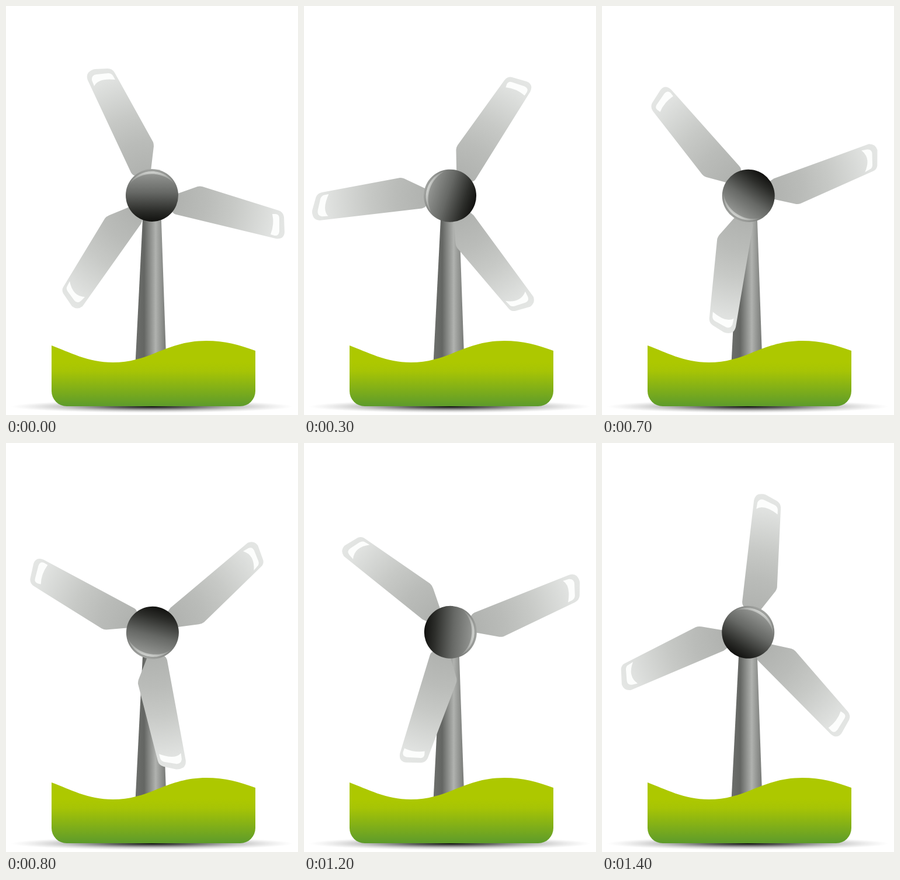
Recreate the animation shown at these times as an HTML page. Size 500 px wide and 700 px high, loop 1500 ms.

```html
<!DOCTYPE html>
<html lang="en">
<head>
<meta charset="utf-8">
<title>Wind turbine</title>
<style>
  html, body { margin: 0; width: 100%; height: 100%; overflow: hidden; background: #fff; }
  svg { display: block; width: 500px; height: 700px; }
</style>
</head>
<body>
<svg viewBox="0 0 500 700">
  <defs>
    <radialGradient id="shadow">
      <stop offset="0" stop-color="#000" stop-opacity=".95"/>
      <stop offset=".3" stop-color="#222" stop-opacity=".7"/>
      <stop offset=".65" stop-color="#555" stop-opacity=".3"/>
      <stop offset="1" stop-color="#999" stop-opacity="0"/>
    </radialGradient>
    <linearGradient id="grass" gradientUnits="userSpaceOnUse" x1="0" y1="610" x2="0" y2="685">
      <stop offset="0" stop-color="#adc800"/>
      <stop offset=".2" stop-color="#a6c405"/>
      <stop offset="1" stop-color="#5d9b2b"/>
    </linearGradient>
    <linearGradient id="steel" gradientUnits="userSpaceOnUse" x1="222" y1="0" x2="274" y2="0">
      <stop offset="0" stop-color="#6c6e6b"/>
      <stop offset=".28" stop-color="#646663"/>
      <stop offset=".66" stop-color="#b0b2af"/>
      <stop offset="1" stop-color="#767875"/>
    </linearGradient>
    <radialGradient id="vane" gradientUnits="userSpaceOnUse" cx="250" cy="324" r="235">
      <stop offset=".15" stop-color="#afb1ae"/>
      <stop offset=".4" stop-color="#babcb9"/>
      <stop offset=".6" stop-color="#c7c9c6"/>
      <stop offset=".9" stop-color="#e0e2e0"/>
      <stop offset="1" stop-color="#e4e6e4"/>
    </radialGradient>
    <linearGradient id="dome" x1="0" y1="0" x2="0" y2="1">
      <stop offset="0" stop-color="#a2a4a1"/>
      <stop offset=".15" stop-color="#8b8d8a"/>
      <stop offset=".45" stop-color="#666865"/>
      <stop offset=".8" stop-color="#2c2d2a"/>
      <stop offset="1" stop-color="#11110f"/>
    </linearGradient>
    <linearGradient id="glint" x1="0" y1="0" x2="0" y2="1">
      <stop offset="0" stop-color="#d2d4d1"/>
      <stop offset="1" stop-color="#a0a29f" stop-opacity=".3"/>
    </linearGradient>
  </defs>

  <ellipse cx="250" cy="685.5" rx="242" ry="11" fill="url(#shadow)"/>
  <path fill="url(#steel)" d="M234.5 355H265.5L274.5 612H221.5Z"/>
  <path fill="url(#grass)" d="M78 581C108 592 140 610 183 610C247 610 275 573 343 573C375 573 400 580 427 590V659A26 26 0 0 1 401 685H104A26 26 0 0 1 78 659Z"/>

  <g id="rotor">
    <g fill="url(#vane)">
      <path d="M140 127Q137 119 141 114Q146 109 152 108L174 107Q182 107 186 114L252 233Q253 236 253 240L248 282Q246 290 238 290L222 291Q217 290 214 285Z"/>
      <path d="M284 324L297 320L328 309Q332 308 336 309L467 350Q475 353 476 361L477 387Q476 400 462 398L292 357Q286 356 284 350Z"/>
      <path d="M216 342L177 358Q172 360 169 364L98 481Q95 486 98 492L113 514Q122 521 131 514L231 373L236 360Z"/>
    </g>
    <g fill="#fcfdfc">
      <path d="M151 137L147 127Q146 118 155 117L175 115Q180 115 183 119L187 126Q158 123 151 137Z"/>
      <path d="M456 356H462Q468 357 468 363V386Q467 394 460 393L453 391Q460 373 456 356Z"/>
      <path d="M109 471L104 481Q103 485 106 489L117 504Q122 510 128 505L135 498Q114 497 109 471Z"/>
    </g>
    <circle cx="250" cy="324" r="45" fill="url(#dome)"/>
    <path fill="url(#glint)" d="M212 304C229 276 271 276 288 304C269 282 231 282 212 304Z"/>
  </g>
</svg>
<script>
  const rotor = document.getElementById('rotor');
  // Counter-clockwise pose in degrees, held for one step each
  const angles = [0, 27.5, 51, 71.6, 90, 107.2, 126, 145.3, 165.4, 187, 211.2, 238, 266.6, 297, 328.3];
  const STEP = 100;

  function draw(now) {
    const step = Math.floor(now / STEP) % angles.length;
    rotor.setAttribute('transform', `rotate(${-angles[step]} 250.5 324.3)`);
    requestAnimationFrame(draw);
  }
  draw(performance.now());
</script>
</body>
</html>
```
